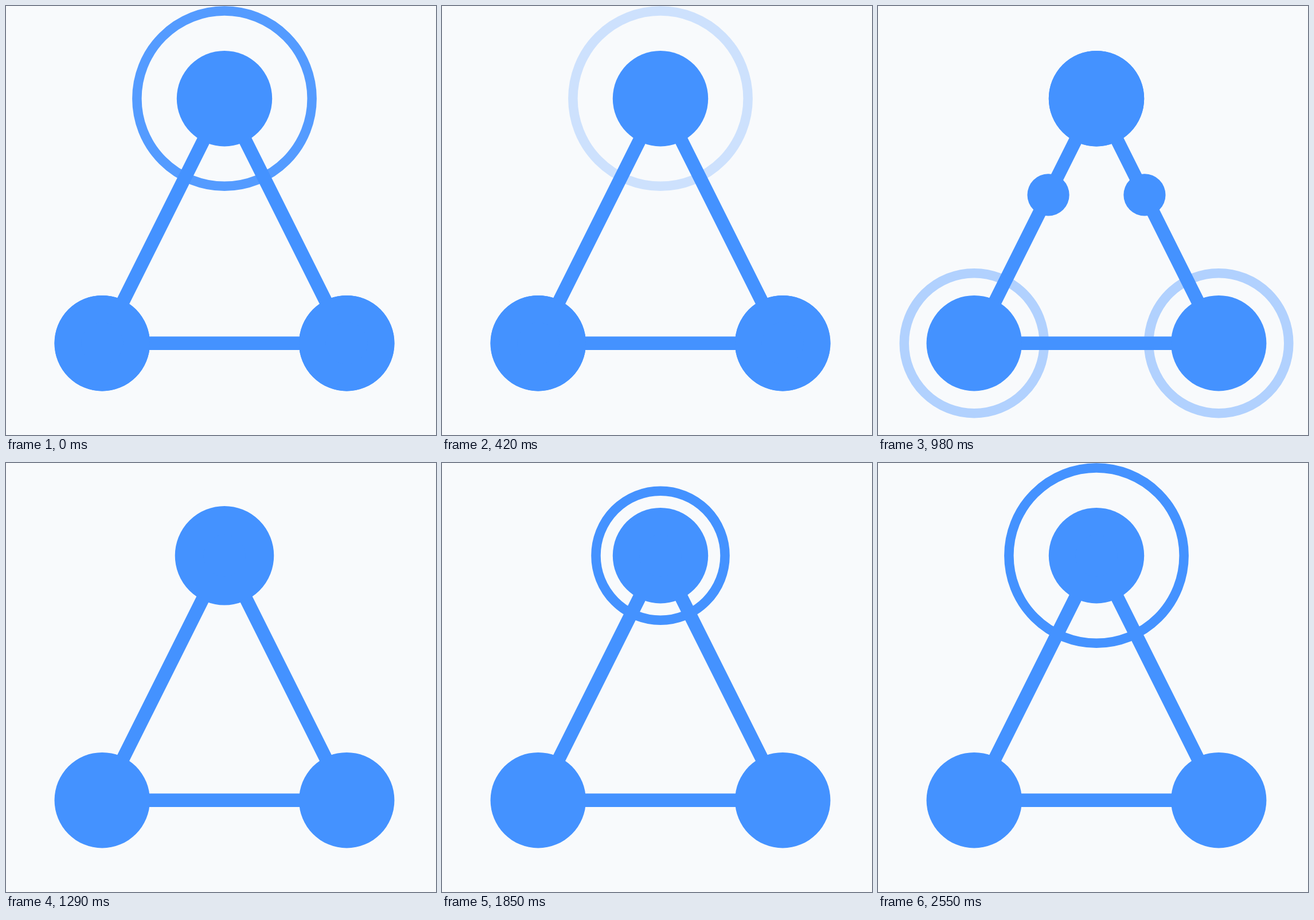
Animation of 750 by 747 pixels, one loop 4.01 s. Source, as an HTML page:

```html
<!DOCTYPE html>
<html lang="en">
<head>
<meta charset="utf-8">
<title>Signal triangle</title>
<style>
  html, body { margin: 0; width: 100%; height: 100%; overflow: hidden; background: #f8fafc; }
  svg { display: block; width: 100%; height: 100%; }
  .ring { fill: none; stroke: #4492ff; stroke-width: 16.5; }
  .solid { fill: #4492ff; }
  .edges { fill: none; stroke: #4492ff; stroke-width: 23.4; }
</style>
</head>
<body>
<svg viewBox="0 0 750 747" preserveAspectRatio="none"></svg>
<script>
const LOOP = 4010, STEP = 70, PAUSE = 1190, RESUME = 1290, LAST = 2550;
const NODE_R = 83.2, RING_MAX = 160.9, STROKE = 16.5;
const FADE = [-60, 630], SEND = [598, 630], GROW = [1240, 1261];
const top_ = { x: 381, y: 161.2 };
const feet = [{ x: 167.75, y: 587.2 }, { x: 594.25, y: 587.2 }];
const svg = document.querySelector('svg');

function add(tag, attrs) {
  const el = document.createElementNS(svg.namespaceURI, tag);
  for (const key in attrs) el.setAttribute(key, attrs[key]);
  return svg.appendChild(el);
}
const circle = (p, r, cls) => add('circle', { cx: p.x, cy: p.y, r, class: cls });

const topRing = circle(top_, NODE_R, 'ring');
const footRings = feet.map(p => circle(p, NODE_R, 'ring'));
add('path', {
  class: 'edges',
  d: `M${top_.x} ${top_.y}L${feet[0].x} ${feet[0].y}H${feet[1].x}Z`
});
[top_, ...feet].forEach(p => circle(p, NODE_R, 'solid'));
const dots = feet.map(p => circle(p, 36.6, 'solid'));

const clamp = v => Math.min(1, Math.max(0, v));
const progress = (t, [start, length]) => clamp((t - start) / length);
const mix = (a, b, p) => a + (b - a) * p;
const fade = p => p > 0.93 ? 0 : 1 - p;

// Hold each pose for one step, with a longer hold before the last ring grows.
function snap(t) {
  if (t < RESUME) return Math.min(PAUSE, Math.floor(t / STEP) * STEP);
  return Math.min(LAST, RESUME + Math.floor((t - RESUME) / STEP) * STEP);
}

function setRing(el, p, opacity) {
  el.setAttribute('r', mix(NODE_R, RING_MAX, p) - STROKE / 2);
  el.setAttribute('opacity', opacity);
}

function draw(time) {
  const t = snap(time);
  const send = progress(t, SEND);
  if (t < SEND[0]) setRing(topRing, 1, fade(progress(t, FADE)));
  else setRing(topRing, progress(t, GROW), 1);

  feet.forEach((foot, i) => {
    setRing(footRings[i], send, fade(send));
    dots[i].setAttribute('cx', mix(foot.x, top_.x, send));
    dots[i].setAttribute('cy', mix(foot.y, top_.y, send));
  });
}

const begin = performance.now();
function tick() {
  draw((performance.now() - begin) % LOOP);
  requestAnimationFrame(tick);
}
tick();
</script>
</body>
</html>
```
